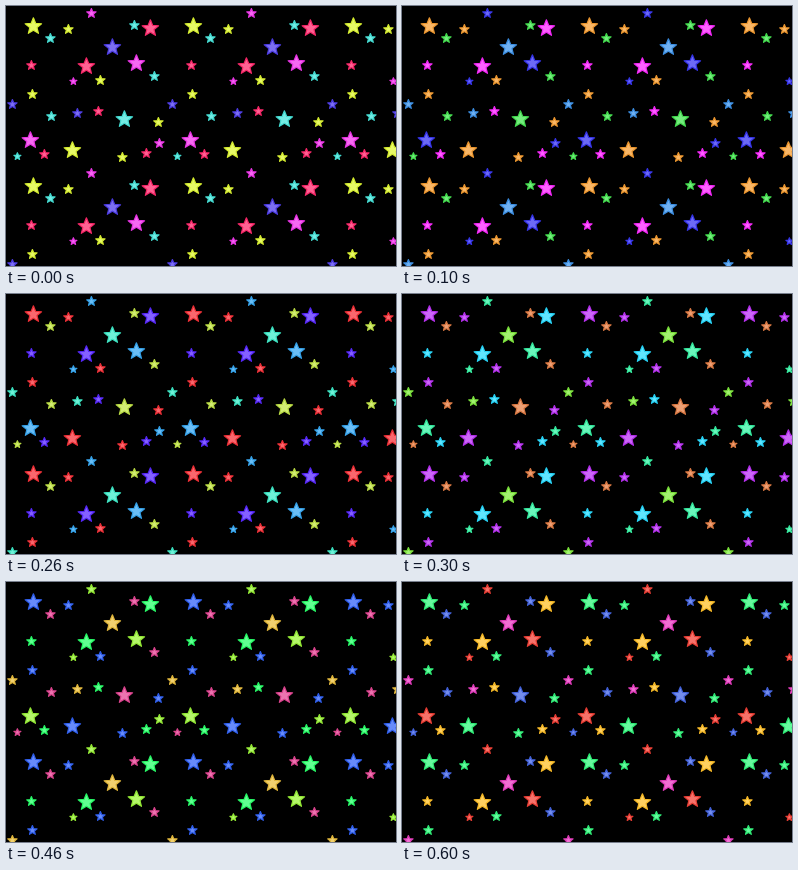
Write an HTML page that moves like this. It is 390x260 px and loops after 700 ms.

```html
<!DOCTYPE html>
<html lang="en">
<head>
<meta charset="utf-8">
<title>Twinkling stars</title>
<style>
  html, body { margin: 0; width: 100%; height: 100%; overflow: hidden; background: #000; }
  svg { display: block; width: 100vw; height: 100vh; }
</style>
</head>
<body>
<svg id="sky" viewBox="0 0 390 260" stroke-width="1.2" stroke-linejoin="round"></svg>
<script>
const WIDTH = 390, HEIGHT = 260, TILE = 160;
const STEP = 100, STEPS = 7;
const RADIUS = { big: 8.6, small: 4.9, tiny: 3.7 };

// Star centres within one tile, grouped by the colour cycle they share.
const groups = [
  { phase: 84, swing: 17, sat: 92,
    big: [[27, 20], [66, 144]],
    small: [[62, 23], [94, 74], [26, 88], [152, 116], [116, 151]] },
  { phase: 176, swing: 0, sat: 76,
    big: [[118, 113]],
    small: [[44, 32], [128, 19], [148, 70], [45, 110]],
    tiny: [[11, 150]] },
  { phase: 302, swing: 10, sat: 88,
    big: [[130, 57], [24, 134]],
    small: [[85, 7], [153, 137]],
    tiny: [[67, 75]] },
  { phase: 259, swing: 13, sat: 82,
    big: [[106, 41]],
    small: [[6, 98], [71, 107]] },
  { phase: 349, swing: -8, sat: 100,
    big: [[144, 22], [80, 60]],
    small: [[25, 59], [92, 105], [140, 147], [38, 148]] }
];

function starPath(x, y, radius) {
  const points = Array.from({ length: 10 }, (_, i) => {
    const r = i % 2 ? radius * 0.44 : radius;
    const a = i * Math.PI / 5;
    return `${(x + r * Math.sin(a)).toFixed(2)},${(y - r * Math.cos(a)).toFixed(2)}`;
  });
  return `M${points.join('L')}Z`;
}

function tiledPath(group) {
  let d = '';
  for (const size in RADIUS)
    for (const [x, y] of group[size] || [])
      for (let dy = 0.4; dy < HEIGHT; dy += TILE)
        for (let dx = 0.4; dx < WIDTH; dx += TILE)
          d += starPath(x + dx, y + dy, RADIUS[size]);
  return d;
}

// An even turn of the colour wheel, with a swing that lingers on some hues.
function hueAt({ phase, swing }, step) {
  const turn = phase - 360 * step / STEPS;
  return turn + swing * Math.sin((turn - 123) * Math.PI / 90);
}

const sky = document.getElementById('sky');
for (const group of groups) {
  group.path = document.createElementNS('http://www.w3.org/2000/svg', 'path');
  group.path.setAttribute('d', tiledPath(group));
  sky.append(group.path);
}

function render(time) {
  const step = Math.floor(time / STEP) % STEPS;
  for (const group of groups) {
    const hue = hueAt(group, step).toFixed(1);
    group.path.setAttribute('fill', `hsl(${hue}, ${group.sat}%, 69%)`);
    group.path.setAttribute('stroke', `hsl(${hue}, ${group.sat - 10}%, 55%)`);
  }
}

const start = performance.now();
function tick() {
  render(performance.now() - start);
  requestAnimationFrame(tick);
}
tick();
</script>
</body>
</html>
```
